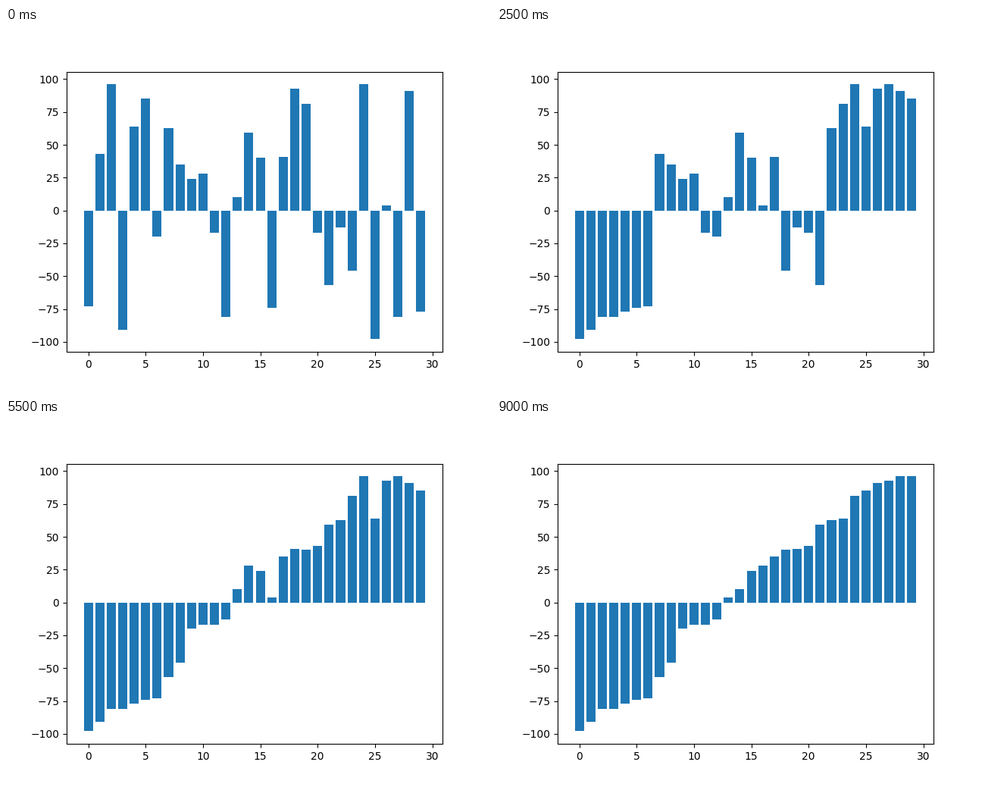
Animation of 640 by 480 pixels, one loop 10000 ms. Source, as a matplotlib script:

```python
import matplotlib.pyplot as plt
from matplotlib.animation import FuncAnimation

FRAMES = 20
STEP_MS = 500

# The unsorted data; every later state follows from the sort itself.
START = (-73, 43, 96, -91, 64, 85, -20, 63, 35, 24, 28, -17, -81, 10, 59,
         40, -74, 41, 93, 81, -17, -57, -13, -46, 96, -98, 4, -81, 91, -77)


def partition(a, lo, hi):
    """Partition a[lo..hi] around its first item by moving a hole inwards."""
    pivot = a[lo]
    while lo < hi:
        while lo < hi and a[hi] >= pivot:
            hi -= 1
        a[lo] = a[hi]
        while lo < hi and a[lo] <= pivot:
            lo += 1
        a[hi] = a[lo]
    a[lo] = pivot
    return lo


def quicksort(a, lo, hi):
    """Sort in place, yielding a copy of the list after every partition."""
    if lo < hi:
        mid = partition(a, lo, hi)
        yield tuple(a)
        yield from quicksort(a, lo, mid - 1)
        yield from quicksort(a, mid + 1, hi)


steps = [START, *quicksort(list(START), 0, len(START) - 1)]

fig, ax = plt.subplots(figsize=(6.4, 4.8), dpi=100)
bars = ax.bar(range(len(START)), START)


def draw(frame):
    heights = steps[min(frame, len(steps) - 1)]
    for bar, height in zip(bars, heights):
        bar.set_height(height)
    return list(bars)


anim = FuncAnimation(fig, draw, frames=FRAMES, interval=STEP_MS,
                     repeat=True, repeat_delay=0)
plt.show()
```
